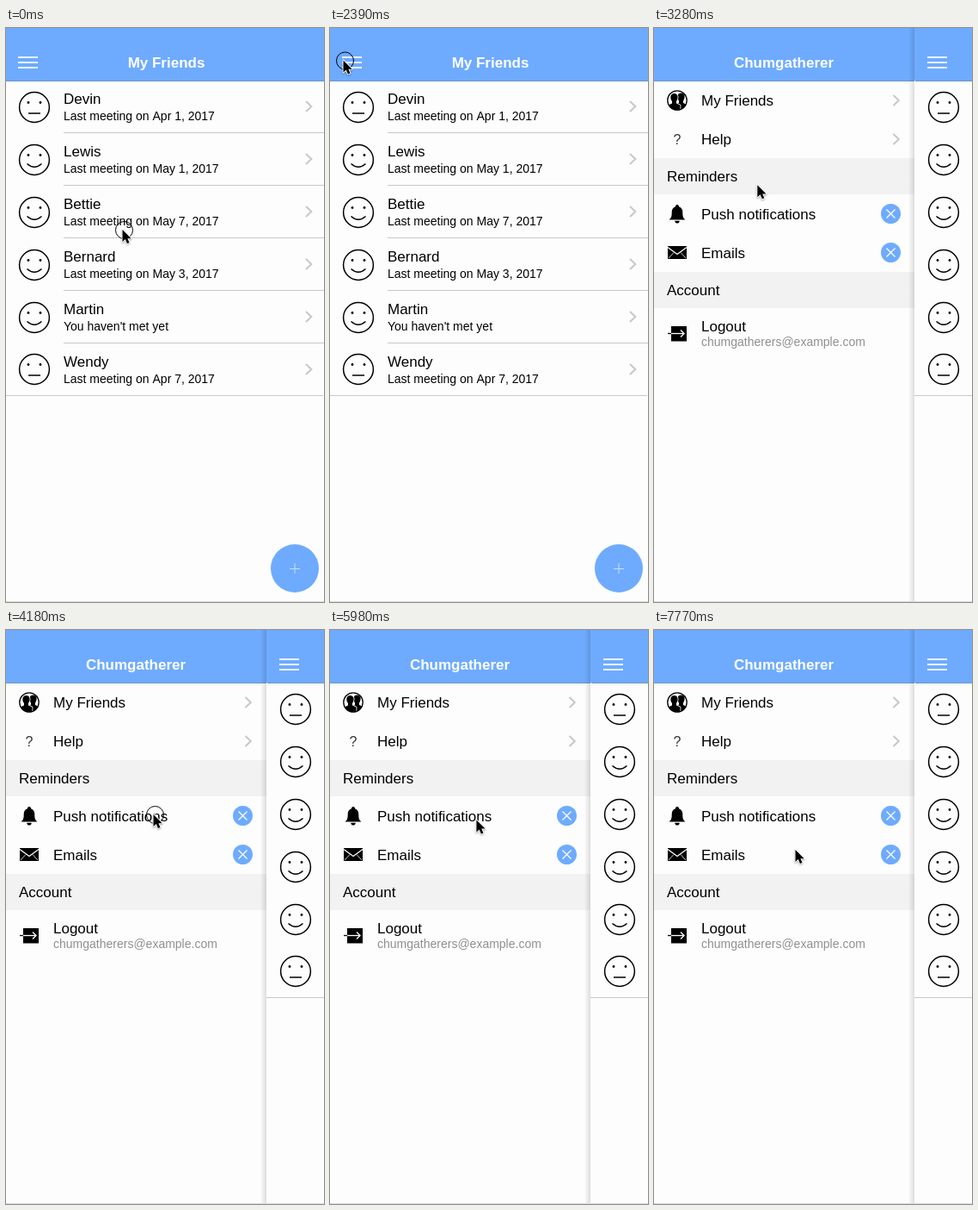
Animation of 370x666 px, one loop 8000 ms. Source, as an HTML page with a canvas:

```html
<!DOCTYPE html>
<html lang="en">
<head>
<meta charset="utf-8">
<title>My Friends</title>
<style>
html, body { margin: 0; width: 100%; height: 100%; overflow: hidden; background: #fdfdfd; }
canvas { display: block; width: 370px; height: 666px; }
</style>
</head>
<body>
<canvas id="stage"></canvas>
<script>
const W = 370, H = 666, LOOP = 8000, TICK = 149.4;
const BLUE = '#6eabfe', PAPER = '#fdfdfd', LINE = '#c8c7cc', BAND = '#f2f2f2';
const FONT = '"Liberation Sans", Arial, sans-serif';
const canvas = document.getElementById('stage');
const ctx = canvas.getContext('2d');
const dpr = window.devicePixelRatio || 1;
canvas.width = W * dpr;
canvas.height = H * dpr;

const friends = [
  ['Devin', 'Last meeting on Apr 1, 2017', false],
  ['Lewis', 'Last meeting on May 1, 2017', true],
  ['Bettie', 'Last meeting on May 7, 2017', true],
  ['Bernard', 'Last meeting on May 3, 2017', true],
  ['Martin', "You haven't met yet", true],
  ['Wendy', 'Last meeting on Apr 7, 2017', false]
];

// Pointer moves: first tick, last tick, destination
const start = [135, 234];
const moves = [
  [10, 15, 15, 37.5],
  [20, 23, 156.5, 233],
  [25, 27, 171, 214],
  [39, 43, 164, 255]
];
const taps = [0, 16, 28, 29, 36, 44, 51];
const sliding = { 17: 45, 18: 282 };
const OPEN = 304;

function rect(x, y, w, h, color) {
  ctx.fillStyle = color;
  ctx.fillRect(x, y, w, h);
}

function text(str, x, y, size = 17, color = '#000', weight = 400, align = 'left') {
  ctx.font = `${weight} ${size}px ${FONT}`;
  ctx.fillStyle = color;
  ctx.textAlign = align;
  ctx.fillText(str, x, y);
}

function line(points, color, width) {
  ctx.beginPath();
  points.forEach(([x, y]) => ctx.lineTo(x, y));
  ctx.strokeStyle = color;
  ctx.lineWidth = width;
  ctx.stroke();
}

function disc(x, y, r, color) {
  ctx.beginPath();
  ctx.arc(x, y, r, 0, Math.PI * 2);
  ctx.fillStyle = color;
  ctx.fill();
}

function ring(x, y, r, width) {
  ctx.beginPath();
  ctx.arc(x, y, r, 0, Math.PI * 2);
  ctx.strokeStyle = '#000';
  ctx.lineWidth = width;
  ctx.stroke();
}

function shape(path, x, y, outline = 0) {
  const p = new Path2D(path);
  ctx.save();
  ctx.translate(x, y);
  if (outline) {
    ctx.strokeStyle = PAPER;
    ctx.lineWidth = outline;
    ctx.stroke(p);
  }
  ctx.fillStyle = '#000';
  ctx.fill(p);
  ctx.restore();
}

function header(title, x, width) {
  rect(0, 0, width, 61, BLUE);
  rect(0, 61, width, 1, '#6f94c6');
  text(title, x, 46, 17, '#fff', 700, 'center');
}

function chevron(x, y) {
  line([[x, y - 6], [x + 6.3, y], [x, y + 6]], '#c7c7cc', 2);
}

function face(x, y, happy) {
  ring(x, y, 17.4, 1.5);
  disc(x - 7, y - 5.5, 1.4, '#000');
  disc(x + 7, y - 5.5, 1.4, '#000');
  ctx.beginPath();
  if (happy) {
    ctx.moveTo(x - 8.5, y + 4.5);
    ctx.quadraticCurveTo(x, y + 12, x + 8.5, y + 4.5);
  } else {
    ctx.moveTo(x - 7, y + 7);
    ctx.lineTo(x + 7, y + 7);
  }
  ctx.stroke();
}

function toggle(y, on) {
  const x = 275.5;
  disc(x, y, 11.5, BLUE);
  if (on) {
    line([[x - 5.5, y + .5], [x - 2, y + 4], [x + 5.5, y - 4]], '#fff', 1.5);
  } else {
    line([[x - 5, y - 5], [x + 5, y + 5]], '#fff', 1.2);
    line([[x + 5, y - 5], [x - 5, y + 5]], '#fff', 1.2);
  }
}

function peopleIcon(x, y) {
  const person = 'M0-8C-5-8-5-2-2.5 1V3.5L-7 5.5V12H7V5.5L2.5 3.5V1C5-2 5-8 0-8Z';
  ctx.save();
  ctx.beginPath();
  ctx.arc(x, y, 11.2, 0, Math.PI * 2);
  ctx.clip();
  shape(person, x + 4.5, y - .5);
  shape(person, x - 3.5, y, 1.6);
  ctx.restore();
  ring(x, y, 11.2, 1.3);
}

function bellIcon(x, y) {
  shape('M0-11C1.5-11 2-10 2-8.8C5-8 6.3-5.5 6.3-2C6.3 3 7 4.5 9.5 6.5H-9.5C-7 4.5-6.3 3-6.3-2C-6.3-5.5-5-8-2-8.8C-2-10-1.5-11 0-11Z M-2.8 7.7H2.8C2.5 11.5-2.5 11.5-2.8 7.7Z', x, y);
}

function mailIcon(x, y) {
  rect(x - 11, y - 7.5, 22, 15, '#000');
  line([[x - 11, y - 6], [x, y + 2], [x + 11, y - 6]], PAPER, 1.3);
  line([[x - 10, y + 6.5], [x - 4, y]], PAPER, .8);
  line([[x + 10, y + 6.5], [x + 4, y]], PAPER, .8);
}

function logoutIcon(x, y) {
  rect(x - 7, y - 8.5, 18, 17.5, '#000');
  line([[x - 11, y], [x - 7, y]], '#000', 1.3);
  line([[x - 7, y], [x + 8, y]], PAPER, 1.3);
  line([[x + 4, y - 4], [x + 8, y], [x + 4, y + 4]], PAPER, 1.3);
}

function drawPanel(tick) {
  header('Chumgatherer', 151, OPEN);
  if (tick === 29) rect(0, 193, OPEN, 45, '#d9d9d9');
  if (tick === 51) rect(0, 238, OPEN, 45, '#d9d9d9');
  rect(0, 151, OPEN, 42, BAND);
  rect(0, 283, OPEN, 42, BAND);

  peopleIcon(27, 84);
  text('?', 27, 134.5, 16, '#333', 400, 'center');
  bellIcon(27, 216);
  mailIcon(27, 260.5);
  logoutIcon(27, 354.5);

  text('My Friends', 55, 90);
  text('Help', 55, 135);
  text('Reminders', 15, 178);
  text('Push notifications', 55, 222);
  text('Emails', 55, 267);
  text('Account', 15, 310);
  text('Logout', 55, 352);
  text('chumgatherers@example.com', 55, 369, 14, '#8f8f8f');

  chevron(278.5, 84);
  chevron(278.5, 129);
  toggle(215.5, tick >= 30 && tick < 37);
  toggle(260.5, tick >= 45 && tick < 52);
}

function drawPage(x) {
  if (x > 0) {
    // The open page casts a shadow and shows one pixel beyond its left edge
    const edge = x - 1;
    const shade = ctx.createLinearGradient(edge - 7, 0, edge, 0);
    shade.addColorStop(0, 'rgba(0,0,0,0)');
    shade.addColorStop(1, 'rgba(0,0,0,.13)');
    rect(edge - 7, 0, 7, H, shade);
    rect(edge, 0, 1, H, PAPER);
    rect(edge, 0, 1, 61, BLUE);
  }
  ctx.save();
  ctx.translate(x, 0);
  rect(0, 0, W, H, PAPER);
  header('My Friends', 186.5, W);
  for (let i = 0; i < 3; i++) rect(14, 33 + i * 6, 23, 2, '#eaf3ff');

  friends.forEach(([name, note, happy], i) => {
    const y = 61 * i;
    const last = i === friends.length - 1;
    face(33, Math.round(91.9 + 60.9 * i), happy);
    text(name, 67, y + 88);
    text(note, 67, y + 107, 14);
    chevron(349, y + 91);
    rect(last ? -1 : 67, y + 121, W, 1, LINE);
  });

  disc(336, 627, 28, BLUE);
  line([[330, 627.5], [342, 627.5]], '#c5deff', 1);
  line([[336, 621], [336, 633]], '#c5deff', 1);
  ctx.restore();
}

function pointerAt(tick) {
  let [x, y] = start;
  for (const [from, to, tx, ty] of moves) {
    const p = Math.min(1, Math.max(0, (tick - from) / (to - from)));
    const e = p * p * (3 - 2 * p);
    x += (tx - x) * e;
    y += (ty - y) * e;
  }
  return [x, y];
}

function drawPointer(tick) {
  const [x, y] = pointerAt(tick);
  if (taps.includes(tick)) ring(x + 2.5, y + .5, 10, 1);
  const arrow = new Path2D('M0 0V14L3.3 11L5.4 16L8 15L5.9 10.2H10.2Z');
  ctx.save();
  ctx.translate(x + .5, y);
  ctx.lineJoin = 'round';
  ctx.shadowColor = 'rgba(0,0,0,.35)';
  ctx.shadowBlur = 2 * dpr;
  ctx.shadowOffsetY = dpr;
  ctx.strokeStyle = '#fff';
  ctx.lineWidth = 1.8;
  ctx.stroke(arrow);
  ctx.shadowColor = 'transparent';
  ctx.fillStyle = '#000';
  ctx.fill(arrow);
  ctx.restore();
}

function draw(time) {
  // The small lead keeps tick changes on the 10 ms grid
  const tick = Math.floor((time % LOOP + 10) / TICK);
  const slide = tick < 17 ? 0 : sliding[tick] || OPEN;
  ctx.setTransform(dpr, 0, 0, dpr, 0, 0);
  rect(0, 0, W, H, PAPER);
  if (slide > 0) drawPanel(tick);
  drawPage(slide);
  rect(0, 665, W, 1, '#dcdcdc');
  drawPointer(tick);
}

const began = performance.now();
function loop() {
  draw(performance.now() - began);
  requestAnimationFrame(loop);
}
loop();
</script>
</body>
</html>
```
